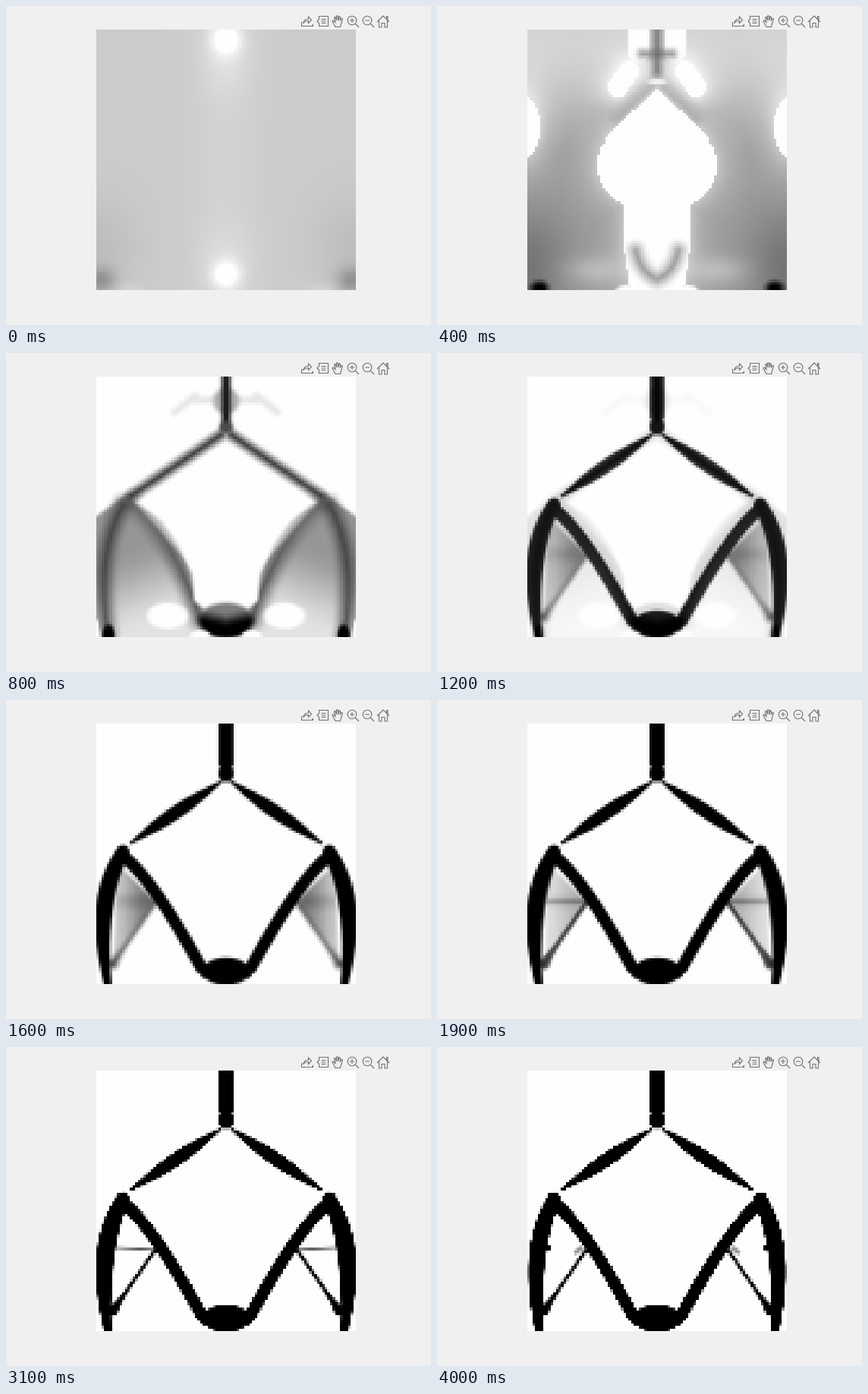
These frames come from a looping animation (560 px wide and 420 px high, 4.1 s). An HTML page with a canvas:

```html
<!DOCTYPE html>
<html lang="en">
<head>
<meta charset="utf-8">
<style>
  html, body { margin: 0; width: 560px; height: 420px; overflow: hidden; background: #f0f0f0; }
  canvas { position: absolute; left: 119px; top: 31px; width: 342px; height: 343px; image-rendering: pixelated; }
  svg { position: absolute; left: 0; top: 0; fill: none; stroke: #707070; stroke-width: 1.1; }
</style>
</head>
<body>
<canvas id="field" width="100" height="100"></canvas>
<svg width="560" height="420">
  <path d="M389.5 21v5.500h12M391.500 23c1-4.500 4-6 7-6v-3l4 4.200-4 4.300v-3c-3 0-5 1-7 3.500z"/>
  <path d="M401.500 27h3.500v-3.500z" fill="#707070" stroke="none"/>
  <path d="M412.500 13.500h12v13h-12v-4l-2.500-2.500 2.500-2.500zM415.500 17.500h6M415.500 20h6M415.500 22.500h6"/>
  <path d="M434 27.500l-4-7.500 1-1 3 2.500-1.500-6.500 1.500-.5 1.500 4.500v-6h2v6l1.500-5 1.500.5-.5 5 2-3 1.500.5-3 10.500z"/>
  <g id="zoom"><circle cx="456" cy="19" r="5.800"/><path d="M453 19h6M460.500 23.500l4.500 4.500"/></g>
  <path d="M456 16v6"/>
  <use href="#zoom" x="20"/>
  <path d="M489 21l8-8 8 8M491.500 19.500v8.500h3.500v-5.500h4v5.500h3.500v-8.500M501.500 17v-3.500h1.500v5"/>
</svg>
<script>
const N = 100, HALF = 50, WHITE = 254, STEP = 100, LOOP = 4100, MID = 290;
const clamp = (v, a = 0, b = 1) => Math.min(b, Math.max(a, v));
const mix = (a, b, u) => a + (b - a) * u;
const ramp = (v, a, b) => { const u = clamp((v - a) / (b - a)); return u * u * (3 - 2 * u); };
const arch = t => Math.sin(Math.PI * t);
const bump = (x, y, cx, cy, rx, ry = rx) => Math.exp(-(((x - cx) / rx) ** 2) - ((y - cy) / ry) ** 2);

// Nearest point on a segment: [distance, position along it]
function nearest(x, y, [ax, ay], [bx, by]) {
  const dx = bx - ax, dy = by - ay;
  const u = clamp(((x - ax) * dx + (y - ay) * dy) / (dx * dx + dy * dy));
  return [Math.hypot(x - ax - u * dx, y - ay - u * dy), u];
}

// Shapes are signed distance functions, negative inside
const ellipse = (cx, cy, rx, ry) => (x, y) =>
  (Math.hypot((x - cx) / rx, (y - cy) / ry) - 1) * Math.min(rx, ry);

const union = (...shapes) => (x, y) => Math.min(...shapes.map(s => s(x, y)));

// A bar from a to b, bent towards c, with a half width that may vary along it
function bar(a, b, half, c) {
  const n = c ? 12 : 1, width = typeof half === "function" ? half : () => half;
  const at = (i, t = i / n) => c
    ? [0, 1].map(k => mix(mix(a[k], c[k], t), mix(c[k], b[k], t), t))
    : [a, b][i];
  const pts = Array.from({ length: n + 1 }, (_, i) => at(i));
  return (x, y) => {
    let best = 1e9;
    for (let i = 0; i < n; i++) {
      const [d, u] = nearest(x, y, pts[i], pts[i + 1]);
      best = Math.min(best, d - width((i + u) / n));
    }
    return best;
  };
}

const poly = (...pts) => (x, y) => {
  let best = 1e9, inside = false;
  pts.forEach((b, i) => {
    const a = pts.at(i - 1);
    best = Math.min(best, nearest(x, y, a, b)[0]);
    if ((a[1] > y) !== (b[1] > y) && x < a[0] + (b[0] - a[0]) * (y - a[1]) / (b[1] - a[1])) inside = !inside;
  });
  return inside ? -best : best;
};

const paint = (shape, gray, soft = 3) => (v, x, y) =>
  mix(v, typeof gray === "function" ? gray(x, y) : gray, ramp(-shape(x, y), -soft / 2, soft / 2));

const diagonal = half => bar([283, 108], [165, 188], half);
const leg = (half, bow = 118) => bar([154, 200], [134, 374], half, [bow, 262]);
const post = (half, end = 98) => bar([MID, 20], [MID, end], half);

// White openings that spread during the early stage
const opening = union(
  ellipse(MID, 210, 79, 63),
  poly([MID, 107], [222, 174], [358, 174]),
  poly([246, 230], [334, 230], [334, 320], [324, 378], [256, 378], [246, 320]),
  bar([238, 107], [253, 86], 13),
  ellipse(115, 159, 21, 41)
);

const start = [(v, x, y) => 203 + 7 * bump(x, 0, MID, 0, 48)
  + 62 * bump(x, y, MID, 44, 19, 20) + 14 * bump(x, y, MID, 72, 30, 45)
  + 60 * bump(x, y, MID, 354, 18) + 10 * bump(x, y, MID, 332, 36, 42)
  - 50 * bump(x, y, 124, 361, 20, 17) - 14 * bump(x, y, 119, 318, 52, 62)
  + 10 * bump(x, y, 164, 372, 18, 9)];

const early = [
  (v, x, y) => 210 - 52 * ramp(y, 50, 210) - 42 * bump(x, y, 119, 345, 58, 85)
    + 30 * bump(x, y, 207, 348, 42, 18) + 40 * Math.exp(-Math.max(0, opening(x, y)) / 15),
  paint(bar([MID, 100], [238, 148], 2), 155, 34),
  (v, x, y) => opening(x, y) < 0 ? WHITE : v,
  paint(ellipse(250, 372, 13, 4), WHITE),
  paint(bar([266, 25], [266, 60], 14), WHITE, 5),
  paint(bar([270, 63], [MID, 63], 3), 115, 20),
  paint(post(4, 86), 100, 20),
  paint(ellipse(MID, 100, 12, 4), 240, 4),
  paint(bar([262, 322], [MID, 360], 4, [268, 350]), 118, 30),
  paint(ellipse(135, 372, 11, 9), 0, 12)
];

const middle = [
  () => WHITE,
  paint(bar([222, 78], [250, 56], 4), 228, 12),
  paint(bar([250, 62], [MID, 62], 4), 228, 10),
  paint(poly([110, 222], [158, 186], [262, 300], [262, 380], [128, 380], [110, 345]),
    (x, y) => mix(150, 226, ramp(y + (x - 160) * .4, 255, 375)), 8),
  paint(bar([168, 200], [256, 350], 5, [224, 250]), (x, y) => mix(85, 30, ramp(y, 220, 340)), 38),
  paint(leg(5), 40, 34),
  paint(ellipse(110, 372, 14, 30), WHITE),
  paint(poly([172, 196], [206, 221], [228, 252], [245, 292], [248, 326], [262, 338], [300, 338], [300, 110]), WHITE, 8),
  paint(ellipse(213, 346, 27, 17), WHITE, 7),
  paint(ellipse(MID, 352, 36, 23), (x, y) => mix(125, 0, ramp(y + Math.abs(x - MID) * .25, 340, 363)), 8),
  paint(ellipse(256, 372, 13, 7), WHITE, 4),
  paint(ellipse(135, 372, 8, 14), 0, 6),
  paint(diagonal(5), 40, 17),
  paint(ellipse(MID, 63, 17, 17), 175, 10),
  paint(post(6, 92), 30, 9),
  paint(ellipse(MID, 98, 9, 8), 75, 8)
];

// Settled structure: extra parts lie under the main members
const settled = (soft, bow, bulge, ...extra) => [
  () => WHITE,
  ...extra,
  paint(diagonal(t => 1.5 + 7.5 * arch(t)), 0, soft),
  paint(bar([158, 208], [257, 352], 8, [197, 242]), 0, soft),
  paint(leg(t => mix(9, 5, t) + bulge * arch(t), bow), 0, soft),
  paint(post(t => 10 - 2 * bump(t, 0, .88, 0, .03)), 0, soft),
  paint(union(bar([265, 357], [MID, 357], 10), ellipse(MID, 357, 31, 18)), 0, soft)
];
const strut = (gray, half, soft) =>
  paint(bar([196, 268], [141, 347], t => half + 5 * t ** 7), gray, soft);

const stages = [
  { at: 0, layers: start },
  { at: 4, layers: early },
  { at: 8, layers: middle },
  { at: 16, layers: settled(5, 115, 4,
      paint(poly([146, 214], [198, 266], [142, 345]),
        (x, y) => 200 - 75 * ramp(x, 142, 190) - 25 * bump(x, y, 165, 265, 40, 10), 9),
      strut(75, 1, 14)) },
  { at: 23, layers: settled(3.5, 118, 5, paint(bar([138, 265], [198, 265], 2), 85, 10), strut(0, 3, 4)) },
  { at: 31, layers: settled(2, 118, 5, paint(bar([140, 264], [196, 267], 1.2), 75, 4), strut(0, 2.3, 3)) },
  { at: 40, layers: settled(1.5, 121, 4, paint(bar([140, 264], [146, 264], 4), 0, 2),
      paint(bar([183, 270], [190, 265], 3), 150, 4), strut(0, 2.2, 3)) }
];

const cells = Array.from({ length: N * HALF }, (_, c) =>
  [119 + (c % HALF + .5) * 3.42, 31 + (Math.floor(c / HALF) + .5) * 3.43]);
for (const s of stages)
  s.values = cells.map(([x, y]) => clamp(s.layers.reduce((v, f) => f(v, x, y), WHITE), 0, WHITE));
const depth = cells.map(([x, y]) => opening(x, y));

const ctx = document.getElementById("field").getContext("2d");
const image = ctx.createImageData(N, N);
image.data.fill(255);

function draw(step) {
  let k = 0;
  while (k < stages.length - 2 && step >= stages[k + 1].at) k++;
  const a = stages[k], b = stages[k + 1];
  let u = (step - a.at) / (b.at - a.at);
  if (k === 2) u = 1 - (1 - u) ** 2;
  const reach = k === 0 ? -50 * (1 - u) : 70 * u;
  cells.forEach((_, c) => {
    let v = mix(a.values[c], b.values[c], u);
    if (k < 2 && u > 0 && b.values[c] > 245 && depth[c] < reach) v = WHITE;
    const row = Math.floor(c / HALF) * N, i = c % HALF;
    for (const col of [i, N - 1 - i]) image.data.fill(Math.round(v), (row + col) * 4, (row + col) * 4 + 3);
  });
  ctx.putImageData(image, 0, 0);
}

const begin = performance.now();
let shown = -1;
function tick() {
  const step = Math.floor(((performance.now() - begin) % LOOP) / STEP);
  if (step !== shown) draw(shown = step);
  requestAnimationFrame(tick);
}
tick();
</script>
</body>
</html>
```
